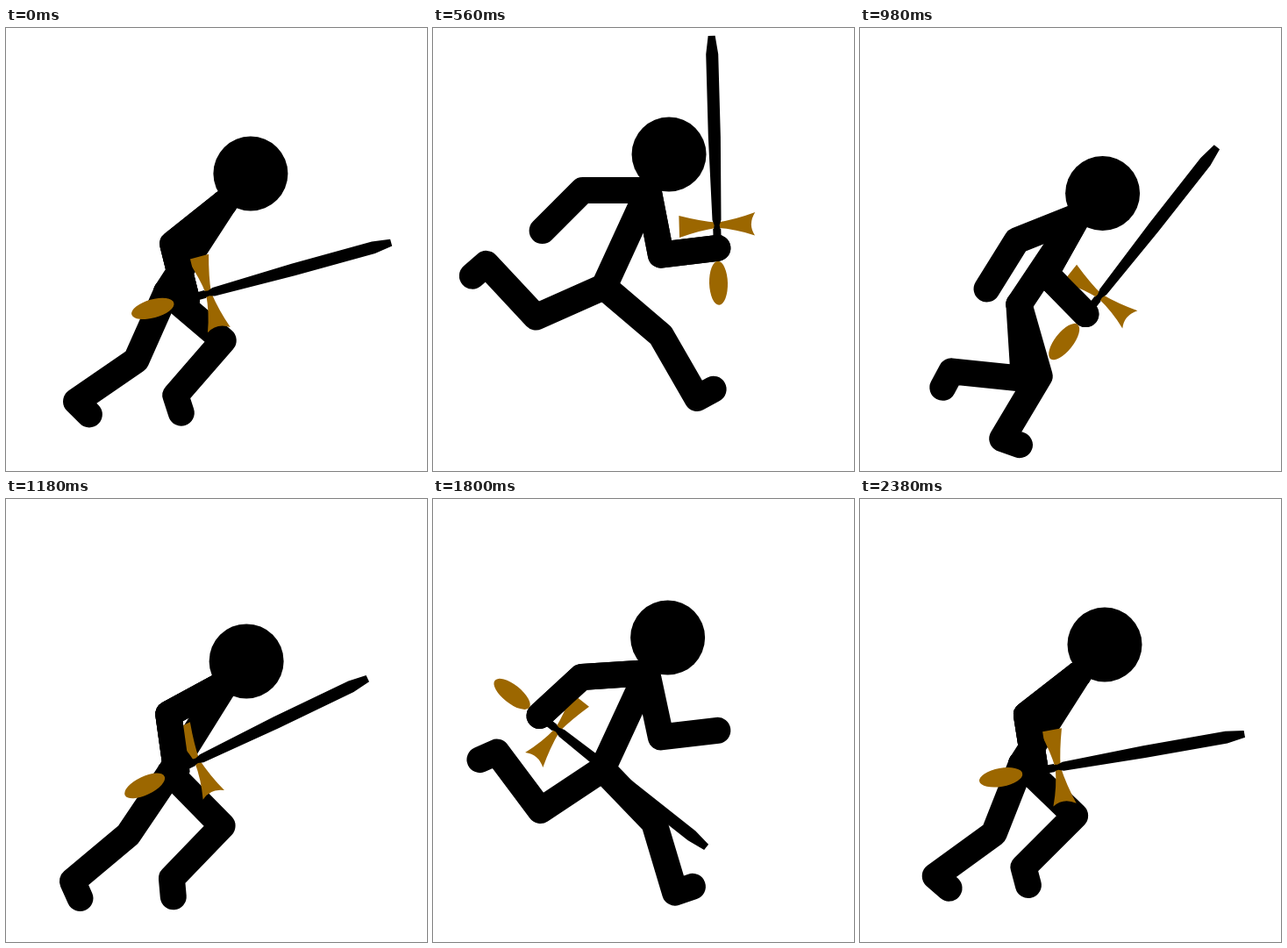
Write an HTML page with a canvas that moves like this. It is 480x505 px and loops after 2400 ms.

```html
<!DOCTYPE html>
<html lang="en">
<head>
<meta charset="utf-8">
<title>Running swordsman</title>
<style>
  html, body { margin: 0; width: 100%; height: 100%; overflow: hidden; background: #fff; }
  canvas { display: block; }
</style>
</head>
<body>
<canvas id="stage" width="480" height="505"></canvas>
<script>
const ctx = document.getElementById('stage').getContext('2d');
const LOOP = 2400, STEP = 20;
const TORSO = 121, ARM = [75, 65], LEG = [85, 83, 21];
const BROWN = '#9c6700';

// hip x, hip y, torso angle, head offset x, y,
// front arm (2 angles), back arm (2), front leg (3), back leg (3)
const poses = {
  cross:  [183, 301, -57, 30, -33.5, 141.5, 76, 141.5, 76, 40.4, 131, 72, 114, 145.5, 45],
  gather: [184, 302, -57.5, 30, -34, 142, 81, 142, 81, 44, 135, 75, 111.5, 144, 41],
  crouch: [187, 312, -58, 23, -24.5, 151.5, 82, 151.5, 82, 45.5, 134, 85, 124, 140, 66],
  leap:   [188, 297, -62.8, 25, -33.5, 91.5, 4.5, 164, 113, 23.5, 92, 3, 148, 170, 121],
  fly:    [195, 295, -65.3, 23.5, -41, 79, -7, 180, 135, 40.4, 60, -29, 156, 227, 139],
  land:   [187, 323, -63.2, 24.5, -35, 83, 2, 164, 136, 56, 110, 10, 120, 228.5, 180],
  stance: [181, 316, -56.6, 28.5, -27, 112, 37, 159, 128, 65.6, 117.5, 13, 94.7, 196.4, 127]
};

// time, pose, sides swapped, sword angle, vertical shift
const keys = [
  [0, 'cross', 0, -15.5, 0],
  [320, 'leap', 0, -77, -3],
  [560, 'fly', 0, -91.6, 0],
  [800, 'land', 0, -87, 0],
  [940, 'stance', 0, -58, 0],
  [1180, 'crouch', 1, -25.7, 0],
  [1480, 'leap', 1, 11.3, 0],
  [1720, 'fly', 1, 33, 5],
  [1940, 'land', 1, 45, 0],
  [2080, 'stance', 1, 47.5, 0],
  [2380, 'gather', 0, -10.1, 0]
].map(([time, name, swapped, sword, shift]) => {
  const p = poses[name].slice();
  p[1] += shift;
  const sides = swapped
    ? [...p.slice(7, 9), ...p.slice(5, 7), ...p.slice(12), ...p.slice(9, 12)]
    : p.slice(5);
  return { time, values: [...p.slice(0, 5), ...sides, sword] };
});

// Key by index, continued before and after the loop
function keyAt(i) {
  const n = keys.length, turn = Math.floor(i / n), key = keys[i - turn * n];
  return { time: key.time + turn * LOOP, values: key.values };
}

function poseAt(t) {
  let i = keys.length - 1;
  while (keys[i].time > t) i--;
  const [a, b, c, d] = [-1, 0, 1, 2].map(k => keyAt(i + k));
  const span = c.time - b.time, u = (t - b.time) / span;
  const u2 = u * u, u3 = u2 * u;
  return b.values.map((from, k) => {
    const to = c.values[k];
    const m0 = (to - a.values[k]) / (c.time - a.time) * span;
    const m1 = (d.values[k] - from) / (d.time - b.time) * span;
    return (2 * u3 - 3 * u2 + 1) * from + (u3 - 2 * u2 + u) * m0
      + (3 * u2 - 2 * u3) * to + (u3 - u2) * m1;
  });
}

const rad = deg => deg * Math.PI / 180;

// Draws a jointed limb and returns its end point
function limb([x, y], angles, lengths) {
  ctx.beginPath();
  ctx.moveTo(x, y);
  angles.forEach((angle, i) => {
    x += lengths[i] * Math.cos(rad(angle));
    y += lengths[i] * Math.sin(rad(angle));
    ctx.lineTo(x, y);
  });
  ctx.stroke();
  return [x, y];
}

function ellipse(x, y, rx, ry, color) {
  ctx.fillStyle = color;
  ctx.beginPath();
  ctx.ellipse(x, y, rx, ry, 0, 0, 2 * Math.PI);
  ctx.fill();
}

// The guard sits at the local origin, the blade along +x
function drawSword([x, y], angle) {
  ctx.save();
  ctx.translate(x, y);
  ctx.rotate(rad(angle));
  ctx.translate(26, 0);
  ellipse(-66, 0, 25, 10.5, BROWN);
  ctx.beginPath();
  ctx.moveTo(-13, -43);
  ctx.quadraticCurveTo(-5, -18, -3, 0);
  ctx.quadraticCurveTo(-5, 22, -13, 43);
  ctx.quadraticCurveTo(0, 35, 13.5, 44);
  ctx.quadraticCurveTo(6, 22, 3, 0);
  ctx.quadraticCurveTo(5, -18, 12, -43);
  ctx.fill();
  ctx.fillStyle = '#000';
  ctx.fillRect(-40, -4.5, 36, 9);
  ctx.beginPath();
  [[-6, -4], [0, -3], [6, -5], [100, -7], [195, -7], [216, -4],
   [216, 4], [195, 7], [100, 7], [6, 5], [0, 3], [-6, 4]].forEach(p => ctx.lineTo(...p));
  ctx.fill();
  ctx.restore();
}

function draw(now) {
  const t = Math.floor(now % LOOP / STEP) * STEP;
  const p = poseAt(t), hip = [p[0], p[1]];
  const swordArm = p.slice(5, 7);

  ctx.fillStyle = '#fff';
  ctx.fillRect(0, 0, 480, 505);
  ctx.strokeStyle = '#000';
  ctx.lineWidth = 30;
  ctx.lineCap = ctx.lineJoin = 'round';

  limb(hip, p.slice(9, 12), LEG);
  limb(hip, p.slice(12, 15), LEG);
  const shoulder = limb(hip, [p[2]], [TORSO]);
  limb(shoulder, p.slice(7, 9), ARM);
  ellipse(shoulder[0] + p[3], shoulder[1] + p[4], 42.5, 42.5, '#000');
  const hand = limb(shoulder, swordArm, ARM);
  drawSword(hand, p[15]);
  limb(shoulder, swordArm, ARM);

  requestAnimationFrame(draw);
}
requestAnimationFrame(draw);
</script>
</body>
</html>
```
